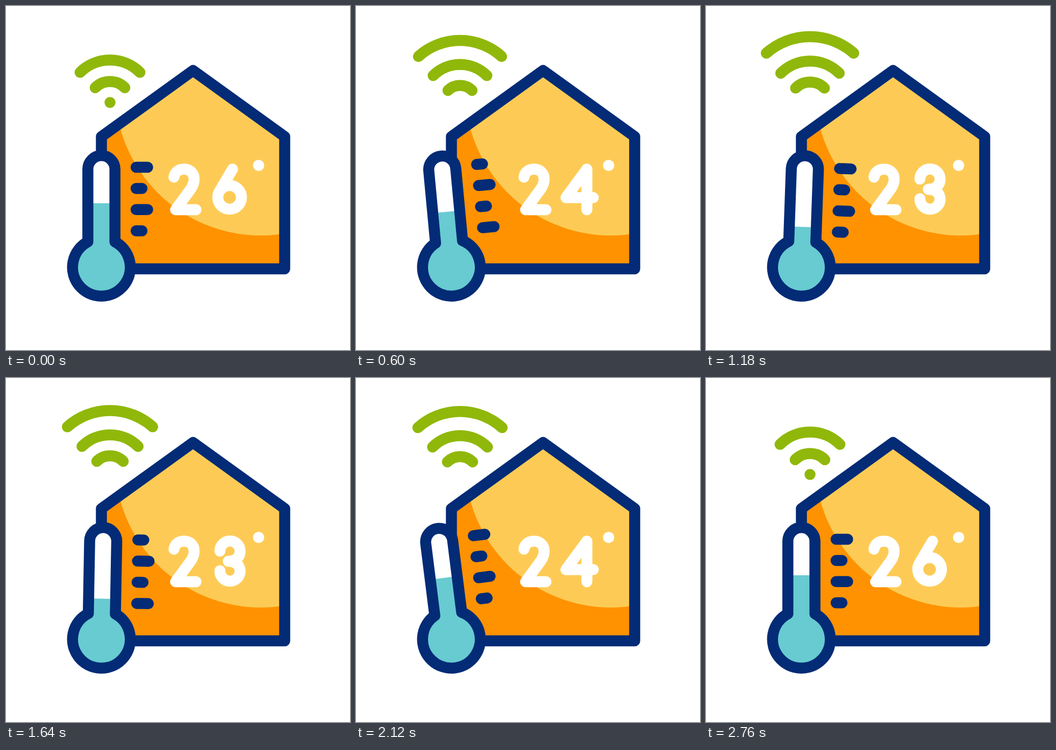
These frames come from a looping animation (640 px wide and 640 px high, 3000 ms). An HTML page:

```html
<!DOCTYPE html>
<html lang="en">
<head>
<meta charset="utf-8">
<title>Smart home thermostat</title>
<style>
  html, body { margin: 0; width: 100%; height: 100%; overflow: hidden; background: #fff; }
  svg { display: block; width: 100%; height: 100%; }
  .line { fill: none; stroke-width: 20.5; stroke-linecap: round; stroke-linejoin: round; }
  .navy { stroke: #032b76; }
  .white { stroke: #fff; }
  .green { stroke: #90b80a; }
</style>
</head>
<body>
<svg viewBox="0 0 640 640">
  <defs>
    <path id="house" d="M177.5 489H518.5V243L348 120L177.5 243Z"/>
    <path id="glass" d="M152.3 438.6V303.5A25.2 25.2 0 0 1 202.7 303.5V438.6A53.7 53.7 0 1 1 152.3 438.6Z"/>
    <clipPath id="inHouse"><use href="#house"/></clipPath>
    <clipPath id="inGlass"><use href="#glass"/></clipPath>
  </defs>

  <use href="#house" fill="#ff9200"/>
  <circle cx="474" cy="156" r="271" fill="#fdcb55" clip-path="url(#inHouse)"/>
  <use href="#house" class="line navy"/>

  <path class="line white" d="M312.5 318.5C314 309 321 303.5 331 303.5C342 303.5 350 311 350 322C350 329 348 334 344 340L315.5 379H353.5"/>
  <path id="digit" class="line white"/>
  <circle cx="470" cy="296.7" r="10.4" fill="#fff"/>

  <g class="line green">
    <path id="wave0"/>
    <path id="wave1"/>
    <path id="wave2"/>
  </g>

  <g id="thermo">
    <use href="#glass" fill="#fff"/>
    <g clip-path="url(#inGlass)">
      <rect id="liquid" x="110" width="135" height="260" fill="#68cbd1"/>
    </g>
    <use href="#glass" class="line navy"/>
    <path id="ticks" class="line navy"/>
  </g>
</svg>
<script>
const LOOP = 3000;
const $ = id => document.getElementById(id);

const digits = {
  3: 'M398 322A18.7 18.7 0 0 1 435.5 322C435.5 333 428 341 413.5 341C428 341 435.5 349 435.5 360A18.7 18.7 0 0 1 398 358.5',
  4: 'M429.5 379V303.5L390.5 356.5H441.5',
  5: 'M434 303.5H402L398.5 338Q406 334.5 416 334.5A22 22 0 1 1 395 364.5',
  6: 'M421.5 303.5L397 345M394 356A22 22 0 1 1 438 356A22 22 0 1 1 394 356'
};

// [time, value] keys
const tilt = [[200, 0], [800, -7.2], [1400, 6], [2000, -8], [2600, 0]];
const level = [[200, 119], [1200, 75], [1600, 75], [2240, 119]];
const reading = [[0, 6], [200, 5], [500, 4], [900, 3], [1900, 4], [2300, 5], [2600, 6]];

function eased(keys, t) {
  if (t <= keys[0][0]) return keys[0][1];
  for (let i = 1; i < keys.length; i++) {
    const [a, from] = keys[i - 1], [b, to] = keys[i];
    if (t < b) {
      const u = (t - a) / (b - a);
      return from + (to - from) * u * u * (3 - 2 * u);
    }
  }
  return keys[keys.length - 1][1];
}

function stepped(keys, t) {
  return keys.filter(k => k[0] <= t).pop()[1];
}

// Arc above the signal's origin, spread evenly to both sides
function arc(r, degrees) {
  const a = degrees * Math.PI / 180;
  const x = r * Math.sin(a), y = 179.5 - r * Math.cos(a);
  if (r < 0.1) return 'M193.5 179.5h0.01';
  return `M${193.5 - x} ${y}A${r} ${r} 0 0 1 ${193.5 + x} ${y}`;
}

function drawSignal(t) {
  const on = t >= 195 && t < 2695;
  const w = on ? 39 * ((t - 195) % 500) / 500 : 0;
  $('wave0').setAttribute('d', arc(w, 45));
  $('wave1').setAttribute('d', arc(39 + w, 45));
  $('wave2').setAttribute('d', arc(79 + 1.15 * w, 44.8 - 0.086 * w));
}

function drawThermo(t) {
  $('thermo').setAttribute('transform', `rotate(${eased(tilt, t)} 177.5 486)`);
  $('liquid').setAttribute('y', 486 - eased(level, t));
  const swap = t >= 200 && t < 2600 && Math.floor((t - 200) / 600) % 2 === 0;
  let d = '';
  for (let i = 0; i < 4; i++) {
    const long = (i % 2 === 0) !== swap;
    d += `M242 ${300 + 39.4 * i}h${long ? 21.5 : 11}`;
  }
  $('ticks').setAttribute('d', d);
}

function draw(t) {
  $('digit').setAttribute('d', digits[stepped(reading, t)]);
  drawSignal(t);
  drawThermo(t);
}

function tick() {
  draw(performance.now() % LOOP);
  requestAnimationFrame(tick);
}
tick();
</script>
</body>
</html>
```
